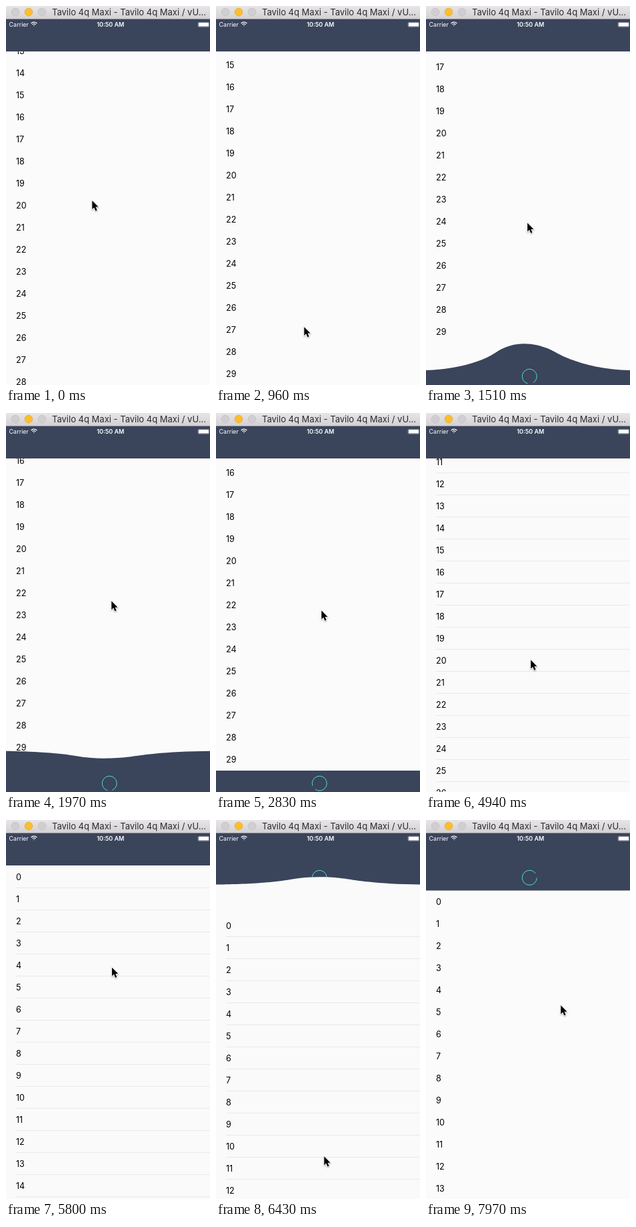
Animation, 306 px wide and 567 px high, one loop 8 s. Source, as an HTML page with a canvas:

```html
<!DOCTYPE html>
<html lang="en">
<head>
<meta charset="utf-8">
<title>Elastic pull to refresh</title>
<style>
  html, body { margin: 0; width: 100%; height: 100%; overflow: hidden; background: #fbfbfb; }
  canvas { display: block; width: 306px; height: 567px; }
</style>
</head>
<body>
<canvas id="stage"></canvas>
<script>
const W = 306, H = 567, LOOP = 8000;
const SCREEN_W = 310.5, NAV_BOTTOM = 68, SCREEN_BOTTOM = 572.5;
const ROWS = 30, ROW_H = 33, LOADING_H = 37.5, MAX_WAVE = 52.5;
const DARK = '#3a445b', TEAL = '#4eddc8', FONT = 'Inter, Roboto, sans-serif';
const TAU = Math.PI * 2;

const canvas = document.getElementById('stage');
const ratio = window.devicePixelRatio || 1;
canvas.width = W * ratio;
canvas.height = H * ratio;
const ctx = canvas.getContext('2d');

const clamp = (x, lo = 0, hi = 1) => Math.min(hi, Math.max(lo, x));
const smooth = x => { x = clamp(x); return x * x * (3 - 2 * x); };

// Monotone cubic interpolation through [time, value] keys.
function track(keys, t) {
  const last = keys.length - 1;
  if (t <= keys[0][0]) return keys[0][1];
  if (t >= keys[last][0]) return keys[last][1];
  const slope = i => (keys[i + 1][1] - keys[i][1]) / (keys[i + 1][0] - keys[i][0]);
  const tangent = i => {
    if (i === 0) return slope(0);
    if (i === last) return 0;
    const a = slope(i - 1), b = slope(i);
    return a * b <= 0 ? 0 : 2 * a * b / (a + b);
  };
  const i = keys.findIndex(key => key[0] > t) - 1;
  const [t0, v0] = keys[i], [t1, v1] = keys[i + 1];
  const d = t1 - t0, u = (t - t0) / d, w = 1 - u;
  return v0 * (1 + 2 * u) * w * w + v1 * u * u * (3 - 2 * u)
    + d * u * w * (tangent(i) * w - tangent(i + 1) * u);
}

const scrollKeys = [[0, -362], [250, -388], [600, -401.5], [4480, -401.5],
  [4940, -290], [5150, -185], [5600, 84.5]];
const cursorX = [[0, 128], [960, 131], [1775, 157], [2850, 157], [3350, 320],
  [4150, 320], [4430, 156], [4940, 156], [6430, 161], [6710, 201]];
const cursorY = [[0, 290], [250, 283], [880, 484], [960, 479], [1775, 280], [2100, 280],
  [2590, 282], [3350, 330], [4150, 290], [4430, 257], [4940, 368], [5200, 485],
  [5850, 215], [6220, 502], [6430, 502], [6710, 276]];

const bottomPull = {
  drag: [[870, 0], [960, 5], [1050, 8], [1400, 58], [1775, 85]],
  released: 1775, finished: 3990, touchX: 148, lift: 28.5, spinAngle: 105
};
const topPull = {
  drag: [[5870, 0], [5950, 22], [6100, 95], [6235, 130]],
  released: 6235, finished: Infinity, touchX: 157, lift: 0, spinAngle: 60
};

// Underdamped spring from 1 to 0.
const spring = s => Math.exp(-7.67 * s) * (Math.cos(16.1 * s) + 0.476 * Math.sin(16.1 * s));

function pullState(pull, t) {
  const shape = list => {
    const wave = Math.min(list * 0.6, MAX_WAVE);
    return { list, wave, edge: list - wave };
  };
  if (t < pull.released) return shape(track(pull.drag, t));
  const s = (t - pull.released) / 1000;
  const start = shape(pull.drag[pull.drag.length - 1][1]);
  const bounce = spring(s), x = s / 0.195;
  const keep = 1 - smooth((t - pull.finished) / 380);
  const settle = (1 - clamp(s / 0.52)) ** 2;
  return {
    list: keep * (LOADING_H + (start.list - LOADING_H) * settle),
    wave: start.wave * bounce,
    edge: keep * (LOADING_H + (start.edge - LOADING_H) * bounce
      + pull.lift * (x * Math.exp(1 - x)) ** 2)
  };
}

function text(string, x, y, font, color, align = 'left') {
  ctx.font = `${font} ${FONT}`;
  ctx.fillStyle = color;
  ctx.textAlign = align;
  ctx.fillText(string, x, y);
}

function circle(x, y, r, fill, stroke) {
  ctx.beginPath();
  ctx.arc(x, y, r, 0, TAU);
  ctx.fillStyle = fill;
  ctx.fill();
  ctx.strokeStyle = stroke;
  ctx.lineWidth = 0.7;
  ctx.stroke();
}

function drawList(origin, showLines) {
  for (let i = 0; i < ROWS; i++) {
    const y = origin + i * ROW_H;
    if (y < 40 || y > H + 20) continue;
    text(i, 15, Math.round(y + 5), '12.6px', '#000');
    if (showLines) {
      ctx.fillStyle = '#e9e9ea';
      ctx.fillRect(15, Math.round(y + 16), W, 1);
    }
  }
}

// Dark elastic area growing from base in direction dir, with its spinner clipped to it.
function drawElastic(pull, state, t, base, dir) {
  if (state.list < 0.05) return;
  const at = depth => base + dir * depth;
  const { edge, wave } = state, cx = pull.touchX;
  const left = Math.min((cx - SCREEN_W / 2) * 0.28, 0);
  const right = SCREEN_W + Math.max((cx - SCREEN_W / 2) * 0.28, 0);
  const lw = cx - left, rw = right - cx;
  const flat = at(edge), shoulder = at(edge + wave * 0.64);
  const l1 = left + lw * 0.71, r1 = right - rw * 0.71;

  ctx.save();
  ctx.beginPath();
  ctx.moveTo(left, base);
  ctx.lineTo(left, flat);
  ctx.bezierCurveTo(left, flat, left + lw * 0.44, flat, l1, shoulder);
  ctx.bezierCurveTo(cx, at(edge + wave * 1.36), r1, shoulder, r1, shoulder);
  ctx.bezierCurveTo(r1, shoulder, right - rw * 0.44, flat, right, flat);
  ctx.lineTo(right, base);
  ctx.closePath();
  ctx.fillStyle = DARK;
  ctx.fill();
  ctx.clip();

  const progress = t < pull.released ? clamp(state.list / 71) : 1;
  const turning = Math.max(0, t - pull.released - 900) * 0.36;
  const angle = (pull.spinAngle + turning) * Math.PI / 180;
  ctx.beginPath();
  ctx.arc(SCREEN_W / 2, at(LOADING_H / 2 - 0.4), 11, angle, angle + TAU * 0.9 * progress);
  ctx.strokeStyle = TEAL;
  ctx.lineWidth = 1;
  ctx.stroke();
  ctx.restore();
}

function drawBattery() {
  ctx.strokeStyle = 'rgba(255,255,255,.45)';
  ctx.lineWidth = 0.7;
  ctx.beginPath();
  ctx.roundRect(287.9, 24.3, 17, 7, 1.6);
  ctx.stroke();
  ctx.fillStyle = '#fff';
  ctx.beginPath();
  ctx.roundRect(288.8, 25.1, 15.2, 5.5, 0.9);
  ctx.fill();
}

function drawChrome() {
  ctx.fillStyle = DARK;
  ctx.fillRect(0, 20, W, NAV_BOTTOM - 20);
  const bar = ctx.createLinearGradient(0, 0, 0, 20);
  bar.addColorStop(0, '#e7e5e7');
  bar.addColorStop(1, '#d2d0d2');
  ctx.fillStyle = bar;
  ctx.fillRect(0, 0, W, 19);
  ctx.fillStyle = '#8f8f98';
  ctx.fillRect(0, 19, W, 1);
  circle(14, 9, 5.8, '#d0ced0', '#bfbdbf');
  circle(34, 9, 5.8, '#fdbe2c', '#e2a427');
  circle(54, 9, 5.8, '#d0ced0', '#bfbdbf');
  text('Tavilo 4q Maxi - Tavilo 4q Maxi / vU...', 69, 14, '13px', '#2c2b2c');

  text('Carrier', 4.5, 31, '9px', '#fff');
  text('10:50 AM', 156.8, 31, '600 9px', '#fff', 'center');
  ctx.strokeStyle = '#fff';
  ctx.lineWidth = 1.3;
  for (const r of [0.8, 3.4, 6]) {
    ctx.beginPath();
    ctx.arc(42, 30.2, r, -Math.PI * 0.76, -Math.PI * 0.24);
    ctx.stroke();
  }
  drawBattery();
}

function drawCursor(x, y) {
  ctx.save();
  ctx.translate(x + 0.8, y + 0.8);
  ctx.scale(0.92, 0.92);
  ctx.shadowColor = 'rgba(0,0,0,.35)';
  ctx.shadowBlur = 2 * ratio;
  ctx.shadowOffsetY = ratio;
  const arrow = new Path2D('M.5 .5V14.5L3.7 11.6L6 17L8.5 16L6.2 10.7H10.6Z');
  ctx.strokeStyle = '#fff';
  ctx.lineWidth = 1.6;
  ctx.stroke(arrow);
  ctx.shadowColor = 'transparent';
  ctx.fillStyle = '#000';
  ctx.fill(arrow);
  ctx.restore();
}

function draw(t) {
  const showLines = t > 4230 && t < 6700;
  const top = pullState(topPull, t), bottom = pullState(bottomPull, t);
  ctx.setTransform(ratio, 0, 0, ratio, 0, 0);
  ctx.fillStyle = showLines ? '#fafafa' : '#fbfbfb';
  ctx.fillRect(0, 0, W, H);
  drawList(track(scrollKeys, t) + top.list - bottom.list, showLines);
  drawElastic(bottomPull, bottom, t, SCREEN_BOTTOM, -1);
  drawElastic(topPull, top, t, NAV_BOTTOM, 1);
  drawChrome();
  drawCursor(track(cursorX, t), track(cursorY, t));
}

const started = performance.now();
function frame() {
  draw((performance.now() - started) % LOOP);
  requestAnimationFrame(frame);
}
frame();
</script>
</body>
</html>
```
